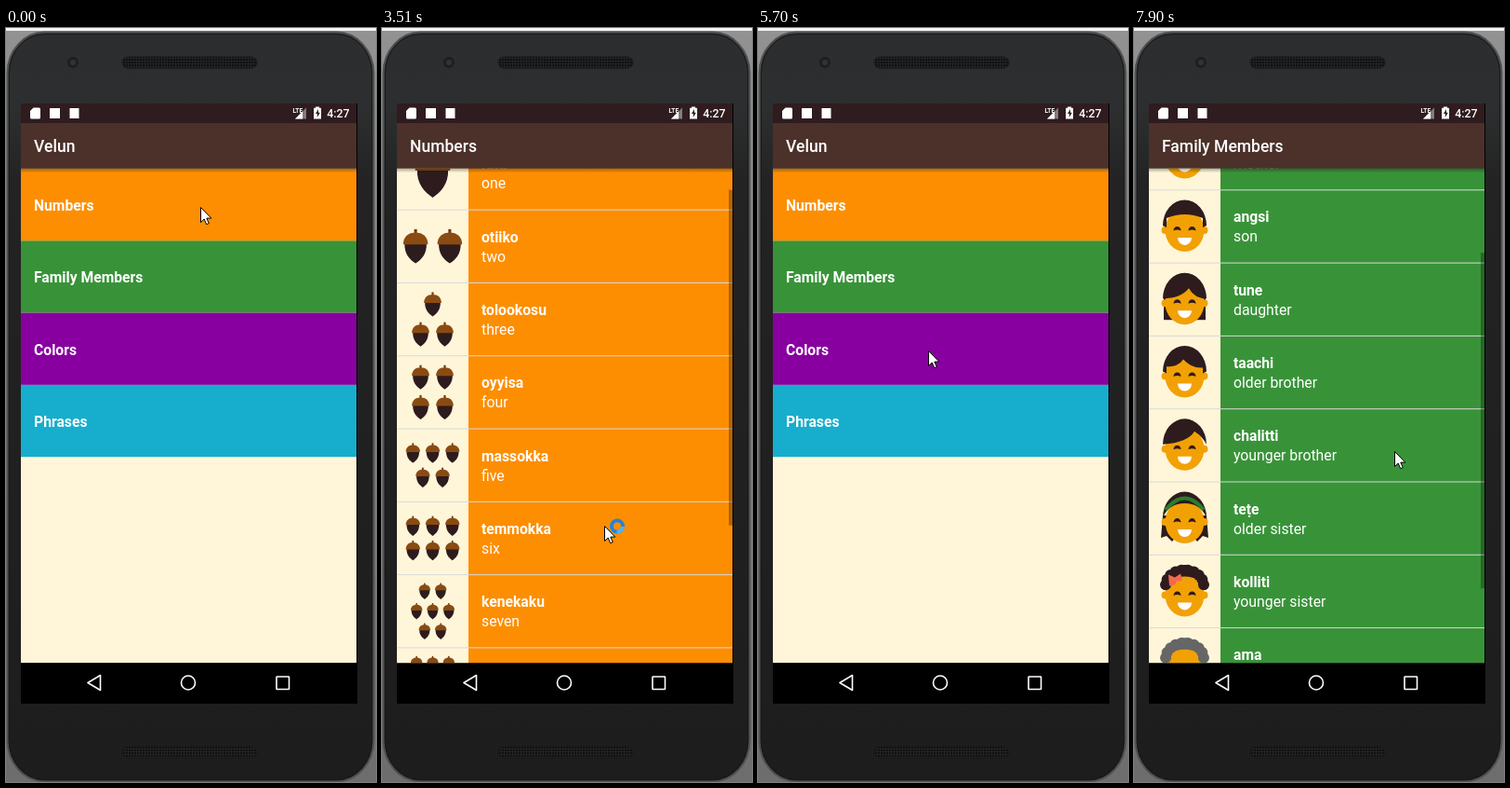
An HTML page for the animation above (8000 ms loop, 398x809 px).

```html
<!DOCTYPE html>
<html lang="en">
<head>
<meta charset="utf-8">
<title>Vocabulary app</title>
<style>
html, body { margin: 0; width: 100%; height: 100%; overflow: hidden; background: #777; }
svg { display: block; width: 398px; height: 809px; }
text { font-family: Roboto, "Noto Sans", sans-serif; fill: #fff; font-size: 15.8px; }
.title { font-size: 17.56px; font-weight: 500; }
.bold { font-size: 15.7px; font-weight: 700; }
</style>
</head>
<body>
<svg id="stage" viewBox="0 0 398 809" xmlns="http://www.w3.org/2000/svg"></svg>
<script>
const LOOP = 8000, LEFT = 16, WIDTH = 361, TOP = 150.5, VIEW = 531, CELL = 77.3, PITCH = 78.3, ROWS = 10;
const DARK = '#2e1b1d', SKIN = '#f2a105', CREAM = '#fff6da', BAR = '#4b312a', STATUS = '#2f1c1f';
const ORANGE = '#fd8e02', GREEN = '#389338';

const rect = (x, y, w, h, fill, more = '') =>
  `<rect x="${x}" y="${y}" width="${w}" height="${h}" fill="${fill}" ${more}/>`;
const oval = (x, y, rx, ry, fill, more = '') =>
  `<ellipse cx="${x}" cy="${y}" rx="${rx}" ry="${ry}" fill="${fill}" ${more}/>`;
const circle = (x, y, r, fill) => oval(x, y, r, r, fill);
const path = (d, fill, more = '') => `<path d="${d}" fill="${fill}" ${more}/>`;
const label = (x, y, s, cls = '') => `<text x="${x}" y="${y}" class="${cls}">${s}</text>`;
const repeat = (n, f) => Array.from({ length: n }, (_, i) => f(i)).join('');

// Each digit is the number of acorns in one line; the grid sets their size
const layouts = '1 2 12 22 32 33 232 332 333 343'.split(' ');
function acorns(i) {
  const lines = [...layouts[i]].map(Number), size = 52 / Math.sqrt(lines.length * Math.max(...lines));
  return lines.map((n, row) => repeat(n, col => {
    const x = 38.5 + (col - (n - 1) / 2) * size;
    const y = 39 + (row - (lines.length - 1) / 2) * size * 1.24;
    return `<use href="#acorn" transform="translate(${x} ${y}) scale(${size / 36})"/>`;
  })).join('');
}

// A hair dome over the head; the fringe is its lower edge from left to right
const dome = (fringe, color = DARK) => path(`M15 38${fringe} 62 38A23.5 27.5 0 0 0 15 38z`, color);
const both = f => f(-1) + f(1);
function face({ fringe, color = DARK, back = '', beard = '', extra = '' }) {
  return back + both(s => circle(38.5 + s * 21, 43, 4, SKIN)) + oval(38.5, 43, 21, 23, SKIN) + beard +
    both(s => path(`M${34.5 + s * 8} 43.5a4 4.5 0 0 1 8 0q-4-2-8 0z`, DARK)) +
    path('M31 51h15a7.5 8 0 0 1-15 0z', '#fff') + dome(fringe, color) + extra;
}
const curls = color => repeat(10, i => {
  const a = Math.PI * (0.02 + i * 0.96 / 9);
  return circle(38.5 + 20.5 * Math.cos(a), 33 - 17 * Math.sin(a), 6, color);
});
const short = 'L19 40V30Q38.5 22 58 30V40L', round = 'Q22 23 38.5 23Q55 23';
const faces = [
  { fringe: short, beard: rect(27, 48, 23, 19, DARK, 'rx="5"') },
  { fringe: 'Q42 39 50 26Q54 34', back: oval(38.5, 18, 12, 9, DARK),
    extra: both(s => circle(38.5 + s * 22, 50, 1.6, '#d8321f')) },
  { fringe: short },
  { fringe: 'Q34 38 43 27Q49 38', back: rect(16, 36, 45, 25, DARK) },
  { fringe: 'L19 40V33Q32 33 37 25Q46 35 58 34V40L' },
  { fringe: 'Q42 36 49 24Q57 29' },
  { fringe: round, back: path('M15 36L13 60 19 58 25 64 31 57H46L52 64 58 58 64 60 62 36z', DARK),
    extra: path('M18 30Q38.5 5 59 30', 'none', 'stroke="#2b7d2e" stroke-width="4"') },
  { fringe: round, extra: curls(DARK) + path('M21 21l7 3 6-4 2 7-6 1-2 4-6 1z', '#f4694f') },
  { fringe: round, color: '#666', extra: curls('#666') }
].map(face);

const pairs = s => s.split(',').map(p => p.split(':'));
const numbers = pairs('lutti:one,otiiko:two,tolookosu:three,oyyisa:four,massokka:five,temmokka:six,kenekaku:seven,kawinta:eight,wo’e:nine,na’aacha:ten');
const family = pairs('əpə:father,əṭa:mother,angsi:son,tune:daughter,taachi:older brother,chalitti:younger brother,teṭe:older sister,kolliti:younger sister,ama:grandmother');

const screen = (id, title, content) => `<g id="${id}">
  ${rect(LEFT, 81, WIDTH, 21, STATUS)}${content}${rect(LEFT, 102, WIDTH, TOP - 102, BAR)}
  ${rect(LEFT, TOP, WIDTH, 5, 'url(#shade)')}${label(30, 133, title, 'title')}</g>`;

function list(id, title, color, words, art) {
  const rows = words.map(([a, b], i) => `<g transform="translate(${LEFT} ${151 + i * PITCH})">
    ${art(i)}${label(91, 34.5, a, 'bold')}${label(91, 55.5, b)}
    ${rect(0, 77.7, WIDTH, 1, '#d9d9d6')}</g>`).join('');
  return screen(id, title, `${rect(LEFT, TOP, WIDTH, VIEW, color)}${rect(LEFT, TOP, 77, VIEW, CREAM)}
    <g clip-path="url(#view)"><g id="${id}Rows">${rows}</g>
    ${rect(373, TOP, 4, VIEW * VIEW / (ROWS * PITCH), '#000', `opacity=".3" id="${id}Bar"`)}</g>`);
}

const menu = [['Numbers', ORANGE], ['Family Members', GREEN], ['Colors', '#8800a0'], ['Phrases', '#16aecc']];
const home = screen('home', 'Velun', rect(LEFT, TOP, WIDTH, VIEW, CREAM) + menu.map(([s, c], i) =>
  rect(LEFT, 151 + i * CELL, WIDTH, CELL, c) + label(30, 196 + i * CELL, s, 'bold')).join(''));

const speaker = y => rect(125, y, 145, 12, 'url(#mesh)', 'rx="6" stroke="#191919"');
const phone = `
  ${rect(0, 0, 398, 809, 'url(#back)')}${rect(0, 0, 398, 3, '#f4f4f4')}
  ${rect(1.5, 4.5, 394, 804, 'url(#body)', 'rx="40" ry="44" stroke="#505253" stroke-width="2"')}
  ${rect(3.5, 6.5, 390, 800, 'none', 'rx="38" ry="42" stroke="#191919"')}
  ${circle(72, 37, 6, '#1d1e20')}${circle(72, 37, 3, '#30343a')}
  ${speaker(31)}${speaker(771)}${rect(LEFT, 81, 362, 644, '#000')}`;

const status = `
  ${path('M29.5 85.5h6q1.5 0 1.5 1.5v9q0 1.5-1.5 1.5h-8q-1.5 0-1.5-1.5v-7z', '#fff')}
  ${rect(47, 86, 11, 11, '#fff')}${rect(68.5, 86, 10, 11, '#fff')}
  <text x="308.5" y="90.5" style="font-size:6.5px;font-weight:700">LTE</text>
  ${path('M323 85.5v12h-12z', '#857a7b')}${path('M319 89.5v8h-8z', '#fff')}
  ${path('M333 84.5h4v1.3h2v11.7h-8V85.8h2z', '#fff')}${path('M336 87l-3 5h1.8v4l3-5.2h-1.8z', STATUS)}
  <text x="345.3" y="96" style="font-size:12.3px;font-weight:500">4:27</text>`;

const nav = `${rect(LEFT, TOP + VIEW, 362, 43, '#000')}
  <g fill="none" stroke="#fff" stroke-width="1.6" stroke-linejoin="round">
  <path d="M88 702.5l13.5-8v16z"/><circle cx="196" cy="702.5" r="7.5"/>
  <rect x="291" y="696" width="13.5" height="13.5" rx=".5"/></g>`;

const fade = (id, ...stops) => `<linearGradient id="${id}" x2="0" y2="1">${stops.map(([o, c, k = 1]) =>
  `<stop offset="${o}" stop-color="${c}" stop-opacity="${k}"/>`).join('')}</linearGradient>`;
const defs = `<defs>
  ${fade('back', [0, '#929292'], [1, '#6d6d6d'])}
  ${fade('body', [0, '#2c2d2e'], [.1, '#2d2e2f'], [.2, '#232324'], [1, '#1d1d1d'])}
  ${fade('shade', [0, '#000', .32], [1, '#000', 0])}
  <pattern id="mesh" width="3" height="3" patternUnits="userSpaceOnUse">
    ${rect(0, 0, 3, 3, '#232323')}${rect(0, 0, 2, 2, '#101010')}</pattern>
  <clipPath id="view">${rect(LEFT, TOP, WIDTH, VIEW, '#000')}</clipPath>
  <clipPath id="app">${rect(LEFT, 81, WIDTH, TOP + VIEW - 81, '#000')}</clipPath>
  <g id="acorn">${rect(-1.5, -18, 3, 5, '#6b3a10')}
    ${path('M-11.5-3h23C12 8 6 14 0 18-6 14-12 8-11.5-3z', DARK)}
    ${path('M-13-2C-13-10-8-14.5 0-14.5S13-10 13-2z', '#8a4b12')}</g>
</defs>`;

const pointer = `<g id="pointer">
  ${path('M.5.5v16l3.7-3.5 2.5 5.7 2.6-1.1-2.5-5.5h5z', '#fff', 'stroke="#000"')}
  <g id="busy">${oval(14, .5, 6, 6, 'none', 'stroke="#2583d6" stroke-width="4"')}
  ${path('M8 .5a6 6 0 0 1 6-6', 'none', 'stroke="#55b4ee" stroke-width="4"')}</g></g>`;

const $ = id => document.getElementById(id);
$('stage').innerHTML = defs + phone + `<g clip-path="url(#app)">${home}
  ${list('num', 'Numbers', ORANGE, numbers, acorns)}
  ${list('fam', 'Family Members', GREEN, family, i => faces[i])}</g>` + status + nav + pointer;

const clamp = (v, lo, hi) => Math.min(hi, Math.max(lo, v));
const ramp = (t, a, b) => clamp((t - a) / (b - a), 0, 1);
const ease = u => u * u * (3 - 2 * u);

const REST = 420, beats = [0, 120, REST, 2530, 3510, 4770, 5700, 6870, 7900, LOOP];
function snap(time) {
  const i = beats.findLastIndex(b => b <= time), a = beats[i], gap = beats[i + 1] - a;
  if (a === REST) return a;
  const step = gap / Math.max(1, Math.round(gap / 140));
  return a + Math.floor((time - a) / step + 1e-6) * step;
}

// Pointer stops: time, x, y
const stops = [
  [0, 209, 192], [REST, 187, 187], [2530, 187, 196], [3230, 236, 702], [3510, 239, 534],
  [4110, 234, 310], [4770, 183, 593], [5080, 92, 704], [5700, 183, 346], [6090, 162, 268],
  [6700, 250, 650], [6870, 255, 598], [7900, 280, 454]
];
function pointerAt(t) {
  const i = clamp(stops.findLastIndex(s => s[0] <= t), 0, stops.length - 2);
  const [t0, x0, y0] = stops[i], [t1, x1, y1] = stops[i + 1], u = ease(ramp(t, t0, t1));
  return [x0 + (x1 - x0) * u, y0 + (y1 - y0) * u];
}

function pose(id, show, scroll) {
  const el = $(id);
  el.style.display = show > 0 ? '' : 'none';
  el.setAttribute('opacity', show);
  el.setAttribute('transform', `translate(0 ${(1 - show) * 48})`);
  $(id + 'Rows').setAttribute('transform', `translate(0 ${-scroll})`);
  $(id + 'Bar').setAttribute('y', TOP + scroll * VIEW / (ROWS * PITCH));
}

function draw(time) {
  const t = snap(time), [x, y] = pointerAt(t);
  const fling = ease(ramp(t, 3330, 4110)) * (ROWS * PITCH - VIEW);
  const drag = t > 6870 ? Math.max(0, 587.7 - y) : 0;
  pose('num', ramp(t, 2740, 2920) - ramp(t, 5100, 5290), fling);
  pose('fam', ramp(t, 6100, 6300), drag);
  $('pointer').setAttribute('transform', `translate(${x} ${y})`);
  $('busy').style.display = t > 2900 && t < 4900 ? '' : 'none';
  $('busy').setAttribute('transform', `rotate(${t * 0.36 % 360} 14 .5)`);
}

const start = performance.now();
function tick() {
  draw((performance.now() - start) % LOOP);
  requestAnimationFrame(tick);
}
tick();
</script>
</body>
</html>
```
